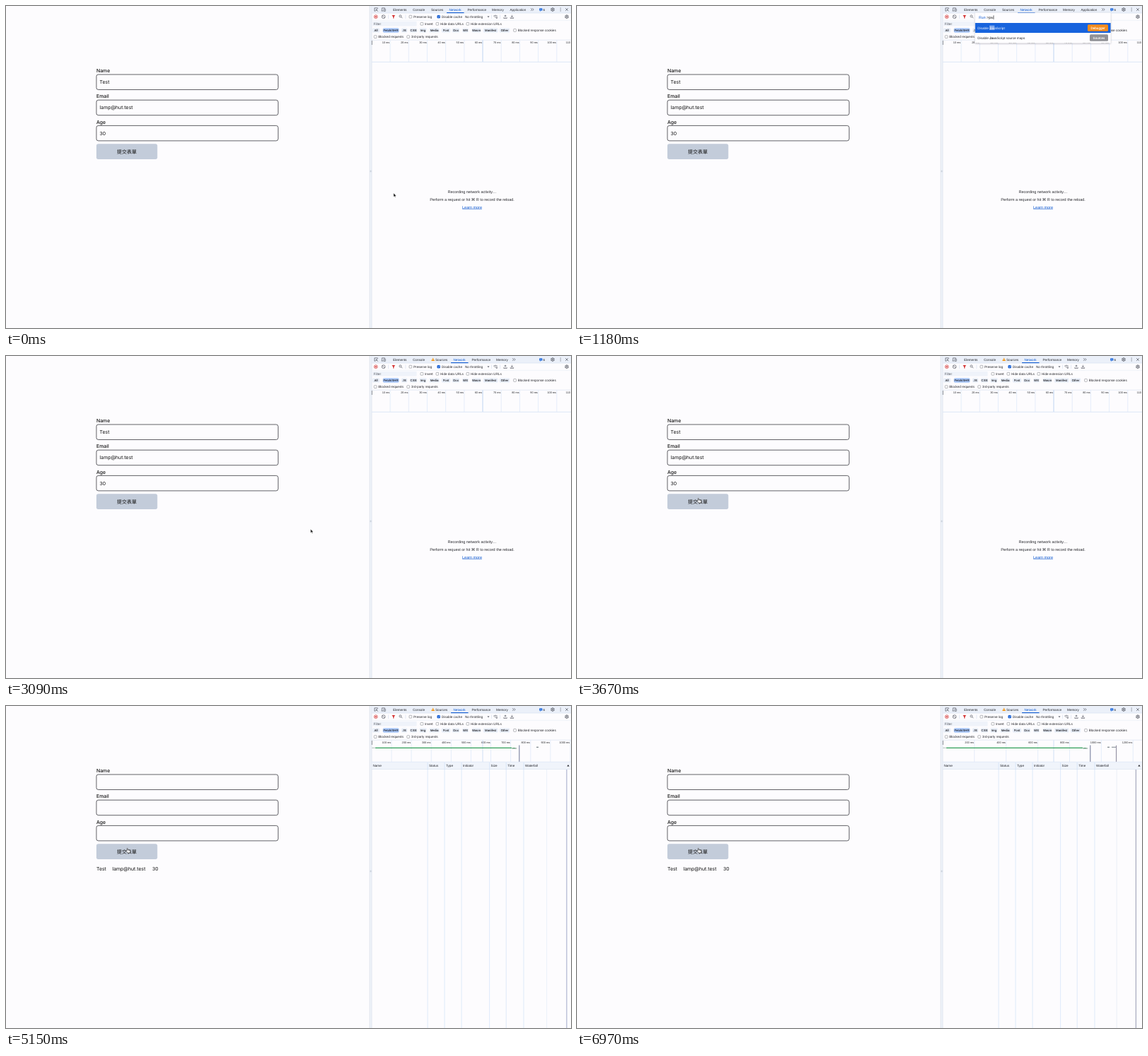
An HTML page for the animation above (7000 ms loop, 800 px wide and 456 px high).

```html
<!DOCTYPE html>
<html lang="en">
<head>
<meta charset="utf-8">
<title>Form and network panel</title>
<style>
html, body { margin: 0; width: 100%; height: 100%; overflow: hidden; background: #fdfcfe; }
svg { display: block; width: 100vw; height: 100vh; }
text { font-family: "Liberation Sans", Arial, sans-serif; text-rendering: geometricPrecision; white-space: pre; }
.form text { font-family: Inter, sans-serif; }
.form .cjk { font-family: "Noto Sans CJK TC", "Noto Sans CJK JP", "Noto Sans CJK", sans-serif; }
</style>
</head>
<body>
<svg id="stage" viewBox="0 0 800 456" xmlns="http://www.w3.org/2000/svg"></svg>
<script>
const LOOP = 7000;
const INK = '#25262b', BLUE = '#0b57d0', GRID = '#d5e3f7', RULE = '#d6dfee', ICON = '#474b55';
const AT = { menu: 790, keys: [1030, 1090, 1150, 1290], blink: 1790, close: 1970, warn: 2000,
  move: 2820, rest: 3550, send: 4190, reply: 4940, load: 5240 };
const HOME = [548.8, 265], GOAL = [171, 201.2];
const EMAIL = 'lamp@hut.test';

const rect = (x, y, w, h, fill, extra = '') =>
  `<rect x="${x}" y="${y}" width="${w}" height="${h}" fill="${fill}" ${extra}/>`;
const line = (x1, y1, x2, y2, color = RULE, w = 0.6) =>
  `<path d="M${x1} ${y1}L${x2} ${y2}" stroke="${color}" stroke-width="${w}"/>`;
const text = (x, y, s, size = 4.66, fill = INK, extra = '') =>
  `<text x="${x}" y="${y}" font-size="${size}" fill="${fill}" ${extra}>${s}</text>`;
const icon = (x, y, d, color = ICON, w = 0.65) =>
  `<path transform="translate(${x} ${y})" d="${d}" fill="none" stroke="${color}" stroke-width="${w}"/>`;
const solid = (x, y, d, color = ICON) =>
  `<path transform="translate(${x} ${y})" d="${d}" fill="${color}"/>`;
const group = (id, body, extra = '') => `<g id="${id}" ${extra}>${body}</g>`;
const middle = 'text-anchor="middle"';
const firm = 'stroke="currentColor" stroke-width=".1"';

const check = (x, y, label, on) =>
  rect(x - 1.9, y - 1.9, 3.8, 3.8, on ? BLUE : '#fff', `rx=".7" stroke="${on ? BLUE : '#73757d'}" stroke-width=".5"`) +
  (on ? icon(x, y, 'M-1.1 .1L-.3 .9L1.2 -.9', '#fff') : '') +
  text(x + 4.2, y + 1.7, label);

const gear = (x, y) =>
  icon(x, y, 'M-2.1 0A2.1 2.1 0 1 0 2.1 0A2.1 2.1 0 1 0 -2.1 0M-.8 0A.8 .8 0 1 0 .8 0A.8 .8 0 1 0 -.8 0') +
  [0, 60, 120].map(a => `<g transform="rotate(${a} ${x} ${y})">` +
    line(x, y - 2.8, x, y - 2, ICON, 0.9) + line(x, y + 2, x, y + 2.8, ICON, 0.9) + '</g>').join('');

function form() {
  const rows = ['Name', 'Email', 'Age'].map((name, i) => {
    const y = 97 + i * 36.2;
    return text(128, y - 2.9, name, 6.9, '#111', 'font-weight="500"') +
      rect(128, y, 257.3, 21.5, '#fdfcfe', 'rx="2.8" stroke="#3a3a40" stroke-width=".8"');
  }).join('');
  const values = ['Test', EMAIL, '30'].map((v, i) => text(132.6, 110.1 + i * 36.2, v, 6.9, '#111')).join('');
  const result = text(128, 233.3, 'Test', 6.9, '#111') + text(150.5, 233.3, EMAIL, 6.9, '#111') +
    text(207, 233.3, '30', 6.9, '#111');
  return `<g class="form">${rows}${group('values', values)}${group('result', result)}` +
    rect(128, 195.3, 86.3, 21.6, '#c3ccda', 'rx="2.6"') +
    text(171, 208.5, '提交表單', 7, '#111', `class="cjk" font-weight="500" ${middle}`) + '</g>';
}

function tabs(id, shift) {
  const list = [['Elements', 548], ['Console', 576], ['Sources', 602 + shift], ['Network', 627.5 + shift],
    ['Performance', 653.5 + shift], ['Memory', 688 + shift]];
  if (!shift) list.push(['Application', 713.5]);
  const more = shift ? 719 : 745;
  return group(id, list.map(([s, x]) => text(x, 6.8, s, 4.66, s === 'Network' ? BLUE : INK)).join('') +
    rect(624 + shift, 9, 24.5, 1.1, BLUE) +
    icon(more, 5, 'M-1.9 -1.8L-.1 0L-1.9 1.8M.4 -1.8L2.2 0L.4 1.8') +
    (shift ? solid(604.6, 5, 'M0 -2.4L2.5 2.1H-2.5Z', '#f29a1f') + line(604.6, 3.9, 604.6, 5.4, '#fff', 0.5) : ''));
}

function toolbar() {
  const chips = [['All', 524], ['Fetch/XHR', 545], ['JS', 564], ['CSS', 577], ['Img', 590.5], ['Media', 606.5],
    ['Font', 623], ['Doc', 637], ['WS', 650.5], ['Wasm', 666], ['Manifest', 686.2], ['Other', 706]];
  const chip = ([s, x], i) => {
    const w = s.length * 2.05 + 4.4;
    return rect(x - w / 2, 31.2, w, 6.6, i === 1 ? '#a9c8fb' : '#e9eff9', 'rx="1.8"') +
      text(x, 36, s, 4.3, INK, `${middle} ${firm} color="${INK}"`);
  };
  return rect(518, 0, 282, 10, '#ebf0f9') + line(518, 10, 800, 10) +
    icon(524, 5, 'M2.2 -1V-2.2H-2.2V2.2H-.8M0 0L2.6 2.6M0 2V0H2') +
    icon(534.5, 5, 'M2 -2.2H-2.2V1.8M-3 2H0M.6 -1H2.7V2.3H.6Z') +
    tabs('tabsA', 0) + tabs('tabsB', 6) +
    rect(755.2, 3.2, 4.2, 3.4, '#1a66db', 'rx=".5"') + solid(756, 6.4, 'M0 0V1.4L1.6 0Z', '#1a66db') +
    line(756.2, 4.9, 758.4, 4.9, '#fff', 0.5) + text(760.6, 6.7, '6', 4.5) +
    gear(774, 5) + [3, 5, 7].map(y => rect(784.7, y - 0.45, 0.9, 0.9, ICON)).join('') +
    icon(794, 5, 'M-1.8 -1.8L1.8 1.8M1.8 -1.8L-1.8 1.8') +
    '<circle cx="523.6" cy="15.2" r="2.4" fill="none" stroke="#d3302f" stroke-width=".7"/>' +
    rect(522.6, 14.2, 2, 2, '#d3302f', 'rx=".3"') +
    icon(534.5, 15.2, 'M-2.4 0A2.4 2.4 0 1 0 2.4 0A2.4 2.4 0 1 0 -2.4 0M-1.7 -1.7L1.7 1.7') +
    [541.5, 565.8, 687.5, 699.6].map(x => line(x, 12.5, x, 18, '#d3dcec')).join('') +
    solid(548.7, 15.2, 'M-2.3 -2.1H2.3L.6 .3V2.3H-.6V.3Z', '#d3302f') +
    icon(558.8, 14.8, 'M-1.9 -.4A1.5 1.5 0 1 0 1.1 -.4A1.5 1.5 0 1 0 -1.9 -.4M.7 .7L2.4 2.4') +
    check(572.8, 15.2, 'Preserve log') + check(612.6, 15.2, 'Disable cache', true) +
    text(650, 16.9, 'No throttling') + solid(683, 15.2, 'M-1.5 -.8H1.5L0 1Z') +
    icon(693, 15, 'M-2.8 -.7Q0 -3 2.8 -.7M-1.5 .7Q-.4 -.2 .6 .3M.8 1.6A.9 .9 0 1 0 2.6 1.6A.9 .9 0 1 0 .8 1.6') +
    icon(707, 15.2, 'M0 1V-2.2M-1.4 -.9L0 -2.3L1.4 -.9M-2.2 .9V2.2H2.2V.9') +
    icon(716.4, 15.2, 'M0 -2.4V.8M-1.4 -.5L0 .9L1.4 -.5M-2.2 .9V2.2H2.2V.9') +
    gear(794, 15.2) + line(518, 20.3, 800, 20.3, '#e6ebf4') +
    rect(519, 21.7, 62.5, 6.8, '#eff3fa', 'rx=".8"') + text(520.6, 27, 'Filter', 4.66, '#50535c') +
    check(588.8, 25.3, 'Invert') + check(610.8, 25.3, 'Hide data URLs') + check(653.8, 25.3, 'Hide extension URLs') +
    chips.map(chip).join('') + check(720.5, 34.4, 'Blocked response cookies') +
    check(523, 43.6, 'Blocked requests') + check(569.6, 43.6, '3rd-party requests') +
    line(518, 48.2, 800, 48.2);
}

function ruler(id, step, unit, count) {
  let out = '';
  for (let i = 1; i <= count; i++) {
    const x = +(517.8 + step * i).toFixed(1);
    out += line(x, 48.5, x, 79, GRID) + text(x - 0.8, 53.3, i * unit + ' ms', 3.85, INK, 'text-anchor="end"');
  }
  return group(id, out);
}

function timeline() {
  const bars = line(518, 59.3, 523, 59.3, '#b9c9c3', 1.1) + line(523, 59.3, 716, 59.3, '#2f9e57', 1.2) +
    line(716.3, 60, 723, 60, '#8fa79b', 1.3) + line(717, 59.6, 721, 59.6, '#3f9a60', 0.7) +
    line(726.8, 55.5, 726.8, 79, '#47527a', 0.8) + line(751, 58.3, 754, 58.3, '#4d5a63', 0.9);
  const late = line(757, 58.3, 763, 58.3, '#6e7880', 0.9) + line(763.6, 55.8, 763.6, 79, '#66647c', 0.8);
  return ruler('rulerA', 26.2, 10, 11) + ruler('rulerB', 28.12, 100, 10) + ruler('rulerC', 44.92, 200, 6) +
    line(675, 48.5, 675, 79, '#bcd3f2', 0.7) + line(518.2, 49, 518.2, 55, '#6d7078', 0.8) +
    group('bars', bars) + group('late', late) + line(518, 79.3, 800, 79.3, '#cfdff6', 0.7);
}

function hint() {
  const row = (y, s, fill, extra = '') => text(660, y, s, 5.45, fill, `${middle} ${extra}`);
  return group('hint', row(265.1, 'Recording network activity…', INK) +
    row(275.7, 'Perform a request or hit ⌘ R to record the reload.', INK) +
    row(286.5, 'Learn more', BLUE, 'text-decoration="underline"'));
}

function table() {
  const cols = [['Name', 519.5], ['Status', 599], ['Type', 623], ['Initiator', 647], ['Size', 686.6],
    ['Time', 710.2], ['Waterfall', 735]];
  return group('table', rect(518, 79.8, 282, 9.6, '#f0f4fb') + line(518, 89.5, 800, 89.5) +
    cols.map(([s, x], i) => text(x, 85.8, s, 4.6) + (i ? line(x - 2, 80, x - 2, 456, '#cbddf7') : '')).join('') +
    solid(796, 84.4, 'M-1.6 1.2L0 -1.4L1.6 1.2Z', INK) +
    group('markB', line(765.6, 90, 765.6, 456, '#dfe8f5') + line(793.9, 90, 793.9, 456, '#8791bb', 0.8)) +
    group('markC', line(764.2, 90, 764.2, 456, '#dfe8f5') + line(791.4, 90, 791.4, 456, '#7d82a0', 0.8)));
}

function pill(mid, y, w, s, fill) {
  return rect(mid - w / 2, y - 4.7, w, 9.4, fill, 'rx="1.5"') +
    text(mid, y + 1.6, s, 4.6, '#fff', `${middle} ${firm} color="#fff"`);
}

const panel = h => rect(563.8, 9.6, 191.8, h, '#fefdff', 'filter="url(#shade)"');
const chosen = rect(563.8, 24, 191.8, 14, '#1763dd');

function menu() {
  const names = ['Application', 'CSS Overview', 'Console', 'Elements', 'Layers', 'Lanternbay', 'Media', 'Memory'];
  const rows = names.map((s, i) => {
    const y = 31 + i * 14;
    return (i > 1 ? line(563.8, y - 7, 755.6, y - 7, '#e7e8ee', 0.5) : '') +
      text(567.2, y + 1.7, 'Show ' + s, 4.66, i ? INK : '#fff') + pill(742, y, 20.4, 'Panel', '#12adc8');
  }).join('');
  const found = panel(42.8) + chosen + '<rect id="mark" x="584" y="27.6" height="6.4" fill="#7fa8ee"/>' +
    text(567.2, 32.7, 'Disable JavaScript', 4.66, '#fff') + pill(737.5, 31, 29, 'Debugger', '#f58c1c') +
    '<text id="match" x="567.2" y="46.7" font-size="4.66" fill="' + INK + '"></text>' +
    pill(739, 45, 26, 'Sources', '#909196');
  return group('menu', group('all', panel(127.8) + chosen + rows) + group('found', found) +
    text(569, 17.9, 'Run', 5.2, BLUE) + '<text id="query" x="579.9" y="17.9" font-size="5.2" fill="#222"></text>' +
    text(583.6, 17.9, 'Command', 5.2, '#c9cad0', 'id="ghost"') + rect(0, 13.2, 0.6, 5.8, '#222', 'id="caret"'));
}

const cursors = group('arrow',
    '<path d="M0 0V5.3L1.3 4.2L2.1 6L3 5.6L2.2 3.9H3.8Z" fill="#111" stroke="#fff" stroke-width=".4"/>') +
  group('hand', '<path d="M.2 .6Q.8 -.2 1.4 .6V2.6L4.4 3.2Q5.1 3.4 5 4.2L4.5 6.8H1.3L-.9 4.4Q-1 3.5 0 3.7L.2 3.9Z"' +
    ' fill="#f4f5f8" stroke="#222" stroke-width=".55"/>');

document.getElementById('stage').innerHTML =
  '<defs><filter id="shade" x="-5%" y="-10%" width="110%" height="125%">' +
  '<feDropShadow dx="0" dy=".8" stdDeviation="1" flood-color="#334" flood-opacity=".38"/></filter></defs>' +
  rect(0, 0, 800, 456, '#fdfcfe') + form() +
  rect(514.8, 0, 3, 456, '#eef2f9') + line(514.8, 0, 514.8, 456, '#d2d8e3', 0.5) + line(517.9, 0, 517.9, 456, '#cdd6e6', 0.5) +
  icon(516.4, 234, 'M-.5 -1.2V1.2M.5 -1.2V1.2', '#9aa1b0', 0.4) +
  toolbar() + timeline() + hint() + table() + menu() + cursors;

const el = {};
document.querySelectorAll('#stage [id]').forEach(n => { el[n.id] = n; });
const show = (id, on) => el[id].setAttribute('display', on ? 'inline' : 'none');
const ADVANCE = [0, 0.5, 1.056, 1.556, 2.112];

function drawMenu(t) {
  const n = AT.keys.filter(k => t >= k).length;
  show('menu', t >= AT.menu && t < AT.close);
  show('all', !n);
  show('ghost', !n);
  show('found', n);
  show('caret', t < AT.blink);
  el.query.textContent = '>' + 'java'.slice(0, n);
  const wide = n ? [0, 0.222, 0.778, 1.278, 1.834][n] : 0;
  el.caret.setAttribute('x', 583 + wide * 5.2);
  el.mark.setAttribute('width', ADVANCE[n] * 4.66);
  el.match.innerHTML = `Disable <tspan font-weight="700">${'Java'.slice(0, n)}</tspan>${'JavaScript'.slice(n)} source maps`;
}

function drawCursor(t) {
  const p = Math.min(1, Math.max(0, (t - AT.move) / (AT.rest - AT.move)));
  const k = p * p * (3 - 2 * p);
  const [x, y] = HOME.map((a, i) => a + (GOAL[i] - a) * k);
  const over = x < 214 && y > 195 && y < 217;
  const seen = t < AT.menu || t >= AT.move;
  show('arrow', seen && !over);
  show('hand', seen && over);
  for (const id of ['arrow', 'hand']) el[id].setAttribute('transform', `translate(${x.toFixed(2)} ${y.toFixed(2)})`);
}

function draw(t) {
  const replied = t >= AT.reply, loaded = t >= AT.load;
  show('tabsA', t < AT.warn);
  show('tabsB', t >= AT.warn);
  show('values', !replied);
  show('result', replied);
  show('hint', t < AT.send);
  show('table', t >= AT.send);
  show('rulerA', !replied);
  show('rulerB', replied && !loaded);
  show('rulerC', loaded);
  show('markB', replied && !loaded);
  show('markC', loaded);
  show('bars', replied);
  show('late', loaded);
  drawMenu(t);
  drawCursor(t);
}

const start = performance.now();
function tick() {
  draw((performance.now() - start) % LOOP);
  requestAnimationFrame(tick);
}
tick();
</script>
</body>
</html>
```
